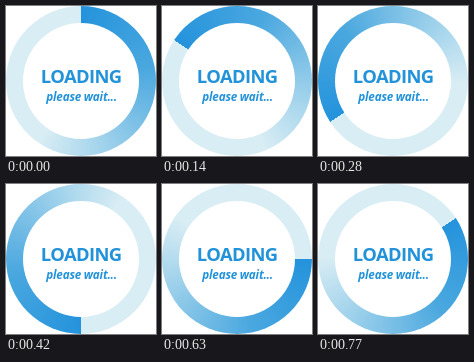
An HTML page for the animation above (840 ms loop, 150 px wide and 150 px high).

```html
<!DOCTYPE html>
<html lang="en">
<head>
<meta charset="utf-8">
<title>Loading</title>
<style>
  html, body { margin: 0; width: 100%; height: 100%; overflow: hidden; background: #fff; }
  #stage { position: relative; width: 150px; height: 150px; }
  #ring, #hole { position: absolute; border-radius: 50%; }
  #ring { inset: 0; }
  #hole { inset: 17px; background: #fff; }
  svg { position: absolute; inset: 0; }
  text { font-family: "Open Sans", "Noto Sans", sans-serif; font-weight: 700; fill: #2292d9; text-anchor: middle; }
</style>
</head>
<body>
<div id="stage">
  <div id="ring"></div>
  <div id="hole"></div>
  <svg width="150" height="150" viewBox="0 0 150 150">
    <text x="75.2" y="77" font-size="18.4" letter-spacing="-0.6">LOADING</text>
    <text x="75.6" y="95" font-size="11.7" letter-spacing="-0.2" font-style="italic">please wait...</text>
  </svg>
</div>
<script>
  const STEP = 70;
  // Counter-clockwise turn of the dark edge at each step; the last two swing back.
  const TURNS = [0, 31, 57, 90, 123, 147, 180, 213, 237, 270, 327, 303];
  const STOPS = "#2493dc 0deg, #4ba8df 80deg, #aad7ed 170deg, #d9edf4 215deg, #d9edf4 360deg";
  const ring = document.getElementById("ring");
  let shown = -1;

  function draw(ms) {
    const step = Math.floor(ms / STEP) % TURNS.length;
    if (step === shown) return;
    shown = step;
    ring.style.background = `conic-gradient(from ${-TURNS[step]}deg, ${STOPS})`;
  }

  const start = performance.now();
  function tick() {
    draw(performance.now() - start);
    requestAnimationFrame(tick);
  }
  draw(0);
  requestAnimationFrame(tick);
</script>
</body>
</html>
```
